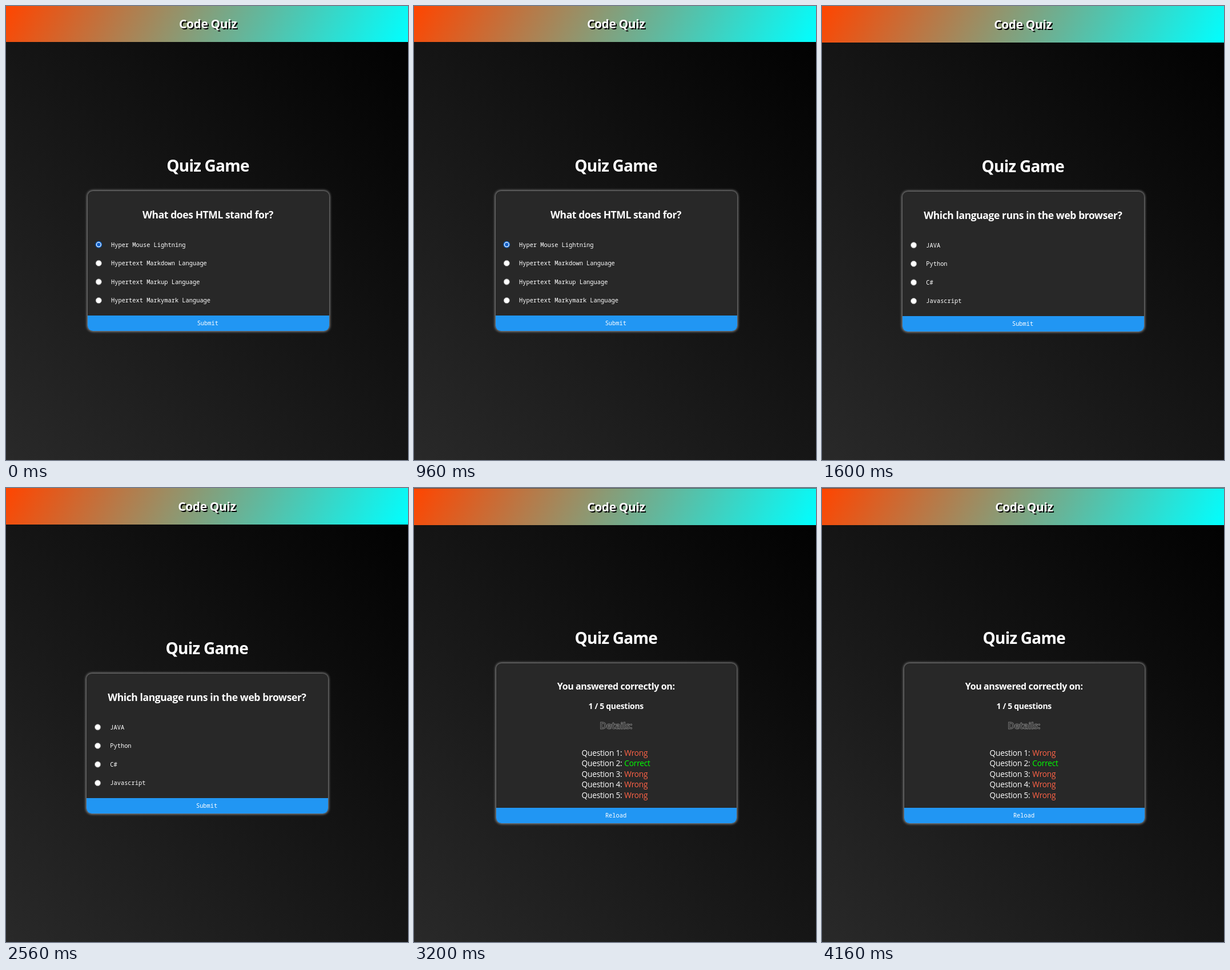
An HTML page that plays this animation: 704x795 px, repeating every 4.8 s.

```html
<!DOCTYPE html>
<html lang="en">
<head>
<meta charset="utf-8">
<title>Code Quiz</title>
<style>
  html, body { margin: 0; width: 100%; height: 100%; overflow: hidden; background: #111; }
  .scene {
    position: absolute; left: 0; top: 0; width: 704px; height: 795px; overflow: hidden;
    background: linear-gradient(45deg, #292929, #000);
    visibility: hidden;
    animation: show 4.8s step-end infinite;
  }
  .scene:nth-child(2) { animation-delay: -3.2s; }
  .scene:nth-child(3) { animation-delay: -1.6s; }
  @keyframes show {
    0% { visibility: visible; }
    33.3333%, 100% { visibility: hidden; }
  }
  header {
    position: absolute; left: 0; width: 100%;
    background: linear-gradient(120deg, #ff4500, #0ff);
  }
  .edge { background: #555; height: 1px; }
  .card {
    position: absolute; overflow: hidden; border-radius: 9px;
    background: #282828; box-shadow: 0 0 4px 1px #999;
  }
  .card i { position: absolute; left: 0; right: 0; bottom: 0; height: 27px; background: #2196f3; }
  svg { position: absolute; left: 0; top: 0; }
  text { fill: #fff; font-family: "Open Sans", "Noto Sans", sans-serif; white-space: pre; }
  .mid { text-anchor: middle; }
  .brand { font-weight: 700; font-size: 21px; letter-spacing: -.02em; text-shadow: 2px 2px #000; }
  .title { font-weight: 700; font-size: 28px; letter-spacing: -.027em; }
  .ask { font-weight: 700; font-size: 17.5px; letter-spacing: -.023em; }
  .head { font-weight: 700; font-size: 16px; letter-spacing: -.024em; }
  .score { font-weight: 700; font-size: 14px; letter-spacing: -.022em; }
  .hollow { fill: #282828; stroke: #777; stroke-width: 1px; }
  .row { font-size: 13.7px; letter-spacing: -.2px; }
  .mono { font-family: "Noto Sans Mono", monospace; font-size: 10.37px; }
  .wrong { fill: #ff6347; }
  .right { fill: #0f0; }
  .radio { fill: #fff; stroke: #767676; }
  .radio.on { stroke: #1166cc; stroke-width: 1.5px; }
  .dot { fill: #0b5ec9; }
</style>
</head>
<body>
<script>
  const text = (cls, x, y, str) => `<text class="${cls}" x="${x}" y="${y}">${str}</text>`;
  const mid = (cls, x, y, str) => text(cls + ' mid', x, y, str);

  function scene({ top = 0, bottom, card: [x, y, w, h], brand, title, button, body }) {
    const cx = x + w / 2;
    return `<div class="scene">
      ${top ? '<header class="edge"></header>' : ''}
      <header style="top:${top}px;height:${bottom - top}px"></header>
      <div class="card" style="left:${x}px;top:${y}px;width:${w}px;height:${h}px"><i></i></div>
      <svg width="704" height="795">
        ${mid('brand', cx - .5, brand, 'Code Quiz')}
        ${mid('title', cx - .5, title, 'Quiz Game')}
        ${body(cx - .5)}
        ${mid('mono', cx - .7, y + h - 10, button)}
      </svg>
    </div>`;
  }

  function question(x, y, bottom, ask, answers, picked) {
    const option = (label, i) => {
      const cy = y + 93.8 + i * 32.6, cx = x + 19.8;
      const on = i === picked;
      return `<circle class="radio${on ? ' on' : ''}" cx="${cx}" cy="${cy}" r="5.2"/>` +
        (on ? `<circle class="dot" cx="${cx}" cy="${cy}" r="3.2"/>` : '') +
        text('mono', x + 41.5, cy + 3.8, label);
    };
    return scene({
      bottom, card: [x, y, 423, 245], brand: bottom - 24, title: y - 34.5, button: 'Submit',
      body: cx => mid('ask', cx, y + 48.3, ask) + answers.map(option).join('')
    });
  }

  const results = [0, 1, 0, 0, 0];
  const resultRow = (ok, i) => {
    const y = 469 + i * 18.4;
    return text('row', 293.5, y, `Question ${i + 1}:`) +
      text('row ' + (ok ? 'right' : 'wrong'), 368.3, y, ok ? 'Correct' : 'Wrong');
  };

  document.body.innerHTML =
    question(142.5, 324, 62.5, 'What does HTML stand for?', [
      'Hyper Mouse Lightning', 'Hypertext Markdown Language',
      'Hypertext Markup Language', 'Hypertext Markymark Language'
    ], 0) +
    question(140.8, 325, 63.5, 'Which language runs in the web browser?',
      ['JAVA', 'Python', 'C#', 'Javascript']) +
    scene({
      top: 1, bottom: 65, card: [143.5, 307, 421.5, 280], brand: 41, title: 272.5, button: 'Reload',
      body: cx => mid('head', cx, 353, 'You answered correctly on:') +
        mid('score', cx, 387, '1 / 5 questions') +
        mid('head hollow', cx, 421.5, 'Details:') +
        results.map(resultRow).join('')
    });
</script>
</body>
</html>
```
